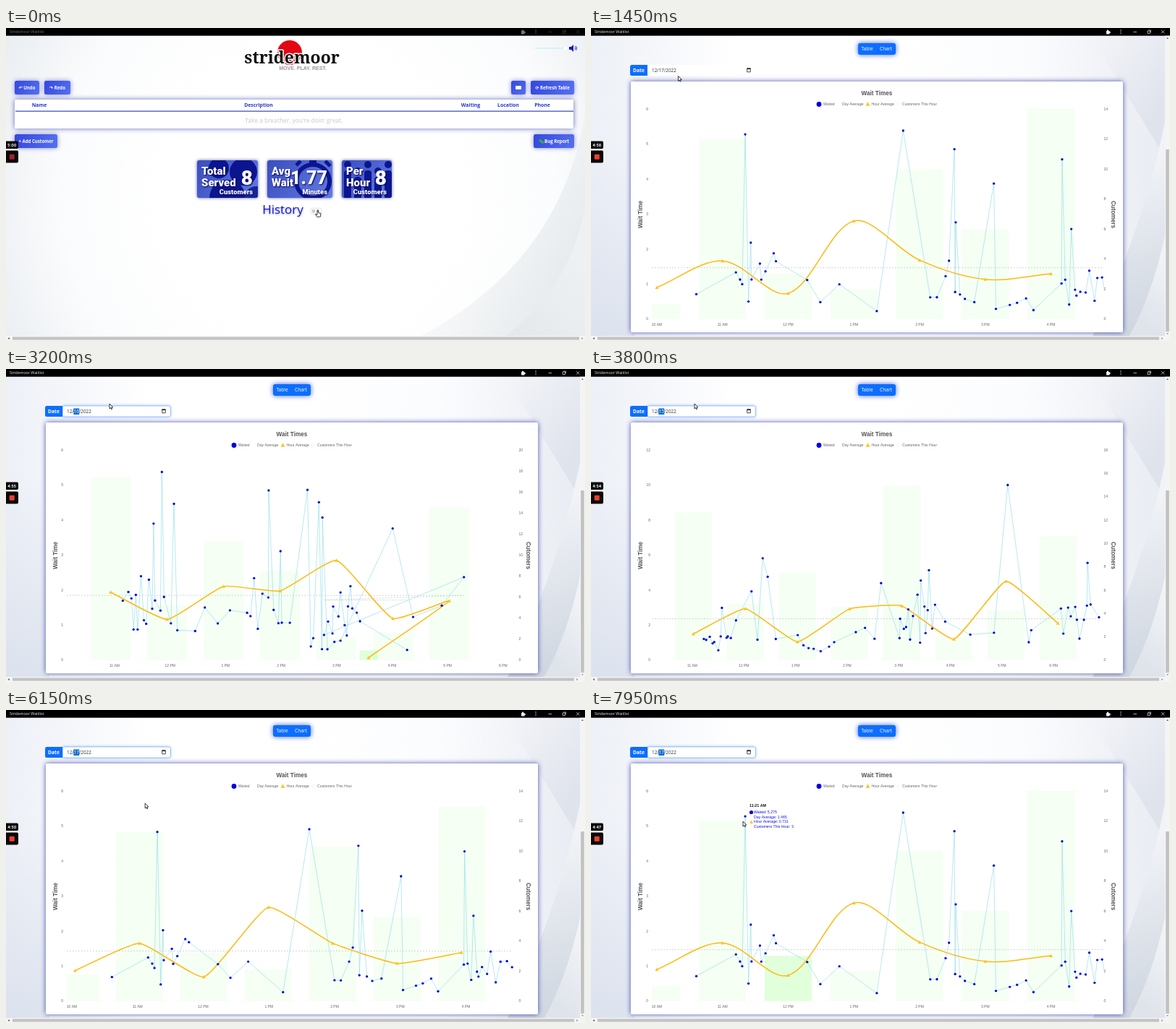
An HTML page with a canvas for the animation above (8 s loop, 800x433 px).

```html
<!DOCTYPE html>
<html lang="en">
<head>
<meta charset="utf-8">
<title>Stridemoor Waitlist</title>
<style>
  html, body { margin: 0; width: 100%; height: 100%; overflow: hidden; background: #fff; }
  canvas { display: block; width: 800px; height: 433px; }
</style>
</head>
<body>
<canvas id="stage" width="800" height="433"></canvas>
<script>
const ctx = document.getElementById('stage').getContext('2d');
const LOOP = 8000, BASE = 402.5, TOP = 112, PAGE_SCROLL = 254;
const ARIAL = '"Liberation Sans", Arial, sans-serif';
const SANS = '"Open Sans", "Noto Sans", sans-serif';
const UI = 'Inter, Roboto, sans-serif';

// Per day: hour axis, scale limits, mean wait and customers per hour, and the longest waits as [hour, minutes].
const sat17 = {
  day: 17, hourX: 91, hourStep: 90.75, firstHour: 10, maxWait: 6, maxCount: 14,
  means: [.9, 1.66, .731, 2.8, 1.68, 1.13, 1.29], counts: [1, 12, 3, 2, 10, 6, 14],
  peaks: [[11.345, 5.275], [11.43, 2.18], [13.75, 5.38], [14.53, 4.85], [14.55, 2.76],
    [15.13, 3.87], [16.17, 4.56], [16.31, 2.57]]
};
const fri16 = {
  day: 16, hourX: 150, hourStep: 76.7, firstHour: 11, maxWait: 6, maxCount: 20,
  means: [2.04, 1.11, 2.24, 1.89, 2.96, 1.19, 1.73, .07], counts: [19, 4, 12, 9, 1, 2, 14, 1],
  peaks: [[11.64, 4.1], [11.72, 5.86], [11.81, 4.37], [13.52, 5.3], [13.7, 3.36],
    [14.17, 4.89], [14.38, 4.7], [14.44, 4.41], [17.68, 2.32]]
};
const thu15 = {
  day: 15, hourX: 140, hourStep: 71.3, firstHour: 11, maxWait: 12, maxCount: 18,
  means: [1.1, 3.04, .52, 2.79, 2.67, 1.01, 4.65, 2.38], counts: [12, 5, 7, 4, 17, 2, 3, 12],
  peaks: [[11.56, 3.08], [12.19, 3.99], [12.43, 4.94], [12.54, 4.9], [14.79, 4.44],
    [15.54, 5.02], [15.68, 5.81], [17.01, 10.72], [18.69, 5.93]]
};
const changes = [[450, null, sat17], [2750, sat17, fri16], [3400, fri16, thu15], [5700, thu15, sat17]];
const OPENED = 450, FOCUSED = 1900, PICKER = [4700, 5700], HOVER = 7350;
// Pointer stops: arrival time, x, y. Each trip takes at most TRAVEL ms.
const TRAVEL = 700;
const stops = [[0, 431, 252], [1300, 125, 68], [1900, 97, 58], [2600, 143, 48], [4600, 218, 57],
  [5300, 174, 110], [5650, 158, 125], [6500, 226, 133], [7400, 210, 154]];

const lerp = (a, b, p) => a + (b - a) * p;
const clamp = v => Math.max(0, Math.min(1, v));
const smooth = v => { v = clamp(v); return v * v * (3 - 2 * v); };
const sum = list => list.reduce((a, b) => a + b, 0);
function seeded(seed) {
  return () => { const v = Math.sin(++seed * 12.9898) * 43758.5453; return v - Math.floor(v); };
}

function text(str, x, y, font, color, align = 'left') {
  ctx.font = font; ctx.fillStyle = color; ctx.textAlign = align; ctx.textBaseline = 'middle';
  ctx.fillText(str, x, y + .5);
}
function rect(x, y, w, h, color) { ctx.fillStyle = color; ctx.fillRect(x, y, w, h); }
function box(x, y, w, h, r, fill, glow, blur = 5) {
  ctx.save();
  if (glow) { ctx.shadowColor = glow; ctx.shadowBlur = blur; }
  ctx.fillStyle = fill;
  ctx.beginPath(); ctx.roundRect(x, y, w, h, r); ctx.fill();
  ctx.restore();
}
function dot(x, y, r, color) {
  ctx.fillStyle = color; ctx.beginPath(); ctx.arc(x, y, r, 0, 7); ctx.fill();
}
function line(points, color, width, dash = []) {
  ctx.strokeStyle = color; ctx.lineWidth = width; ctx.setLineDash(dash); ctx.beginPath();
  points.forEach(p => ctx.lineTo(...p));
  ctx.stroke(); ctx.setLineDash([]);
}
function shape(points, fill) {
  ctx.fillStyle = fill; ctx.beginPath();
  points.forEach(p => ctx.lineTo(...p));
  ctx.closePath(); ctx.fill();
}
const triangle = (x, y, r, color) => shape([[x, y - r], [x + r, y + r * .8], [x - r, y + r * .8]], color);
function colorStops(g, colors) {
  colors.forEach((c, i) => g.addColorStop(i / (colors.length - 1), c));
  return g;
}
const gradient = (x0, y0, x1, y1, ...colors) => colorStops(ctx.createLinearGradient(x0, y0, x1, y1), colors);
// Region right of a curve, down to the corner of the stage.
function swoosh(x0, y0, cx, cy, x1, y1, fill) {
  ctx.fillStyle = fill; ctx.beginPath(); ctx.moveTo(x0, y0);
  ctx.quadraticCurveTo(cx, cy, x1, y1);
  ctx.lineTo(800, 433); ctx.lineTo(800, y0); ctx.fill();
}

function background(open) {
  if (!open) {
    const glow = ctx.createRadialGradient(420, 230, 200, 420, 230, 480);
    rect(0, 0, 800, 433, colorStops(glow, ['#ffffff', '#fbfcfd', '#e9edf1']));
    swoosh(800, 120, 765, 330, 560, 433, gradient(600, 330, 800, 433, '#fafbfb', '#dfe4e8'));
    swoosh(800, 250, 775, 370, 680, 433, gradient(700, 433, 800, 330, '#e4e8eb', '#eef1f3'));
    return;
  }
  rect(0, 0, 800, 433, gradient(0, 0, 800, 0, '#edf0f7', '#ffffff', '#ffffff', '#fbfcfe', '#e8ebf2'));
  rect(0, 150, 60, 283, gradient(0, 150, 0, 433, 'rgba(215,222,235,0)', 'rgba(215,222,235,.8)'));
  shape([[690, 10], [800, 10], [800, 190]], gradient(690, 10, 800, 100, '#f4f5f9', '#dfe3ec'));
  swoosh(800, 90, 775, 250, 690, 433, gradient(720, 200, 800, 400, '#f1f3f7', '#cfd6e0'));
  swoosh(800, 250, 782, 360, 740, 433, gradient(750, 400, 800, 330, '#dfe4eb', '#f0f2f6'));
}

function button(label, x, y, w) {
  box(x, y, w, 19, 2.5, gradient(x, y, x + w, y + 19, '#3548dc', '#5470f0'), 'rgba(40,50,190,.55)', 6);
  text(label, x + w / 2, y + 9.5, `bold 6.1px ${SANS}`, '#fff', 'center');
}
function statCard(x, w, lines, value, size, unit, decorate) {
  ctx.save();
  box(x, 183, w, 52, 3, gradient(x, 183, x + w, 235, '#3a4ec0', '#627ae2'), 'rgba(30,40,120,.7)', 4);
  ctx.beginPath(); ctx.roundRect(x, 183, w, 52, 3); ctx.clip();
  decorate();
  ctx.shadowColor = '#000050'; ctx.shadowBlur = 2; ctx.shadowOffsetX = ctx.shadowOffsetY = 1;
  const font = s => `900 condensed ${s}px Roboto, sans-serif`;
  lines.forEach((s, i) => text(s, x + 6, 198 + 16 * i, font(15), '#fff'));
  text(value, x + w - 7, 208, font(size), '#fff', 'right');
  text(unit, x + w - 7, 227, font(9.4), '#fff', 'right');
  ctx.restore();
}

function waitlistPage(t) {
  const navy = '#0c1590', blue = '#2638c8';
  dot(392, 34, 17, '#e30613');
  ctx.font = 'bold 23px "Noto Serif", serif'; ctx.textAlign = 'center'; ctx.textBaseline = 'middle';
  ctx.strokeStyle = '#fff'; ctx.lineWidth = 3; ctx.lineJoin = 'round';
  ctx.strokeText('stridemoor', 395, 42.5);
  text('stridemoor', 395, 42, ctx.font, '#111', 'center');
  text('MOVE. PLAY. REST.', 410, 56, `bold 7px ${ARIAL}`, '#999', 'center');

  line([[731, 28], [773, 28]], '#c9f3f8', 1.5);
  dot(773, 28, 2.3, '#fff');
  shape([[778, 26], [781, 26], [784, 23], [784, 33], [781, 30], [778, 30]], '#1515c8');
  ctx.strokeStyle = '#1515c8'; ctx.lineWidth = 1;
  [2, 4].forEach(r => { ctx.beginPath(); ctx.arc(784.5, 28, r, -.9, .9); ctx.stroke(); });

  button('↶ Undo', 12, 73, 34);
  button('↷ Redo', 53, 73, 36);
  button('', 698, 73, 20);
  box(704, 80, 8, 5, 1, '#fff');
  button('⟳ Refresh Table', 725, 73, 60);
  box(12, 99, 772, 40, 2, '#fff', 'rgba(50,60,170,.75)', 7);
  [['Name', 46], ['Description', 349], ['Waiting', 642], ['Location', 694], ['Phone', 741]]
    .forEach(([s, x]) => text(s, x, 107, `bold 6.9px ${SANS}`, blue, 'center'));
  rect(13, 114.5, 771, 1.2, '#3444bd');
  text('Take a breather, you\'re doin\' great.', 398, 128, `600 8.1px ${SANS}`, '#d3d5da', 'center');
  button('+ Add Customer', 12, 147, 59);
  button('     Bug Report', 729, 147, 56);
  ctx.save(); ctx.translate(740, 157); ctx.rotate(.6);
  box(-4, -1.7, 8, 3.4, 1.7, '#35ac45'); ctx.restore();

  statCard(264, 84, ['Total', 'Served'], '8', 28, 'Customers', () => {
    dot(294, 194, 14, navy); dot(328, 199, 19, navy); dot(306, 235, 25, navy); dot(346, 236, 17, '#18269a');
  });
  statCard(361, 90, ['Avg', 'Wait'], '1.77', 25, 'Minutes', () => {
    ctx.strokeStyle = navy; ctx.lineWidth = 6;
    ctx.beginPath(); ctx.arc(424, 212, 23, 0, 7); ctx.stroke();
    rect(419, 183, 10, 5, navy);
    line([[401, 190], [407, 184]], navy, 5);
    line([[441, 184], [448, 191]], navy, 5);
  });
  statCard(464, 69, ['Per', 'Hour'], '8', 28, 'Customers', () => {
    for (let i = 0; i < 5; i++) {
      const y = 197 + 9 * (i % 2);
      box(467 + 14 * i, y, 10, 40, 4, navy);
      dot(472 + 14 * i, y - 8, 5, navy);
    }
  });
  ctx.save(); ctx.shadowColor = 'rgba(30,30,220,.5)'; ctx.shadowBlur = 3; ctx.shadowOffsetY = 1;
  text('History', 382.5, 252, `17px ${SANS}`, '#1616d2', 'center'); ctx.restore();
  box(421, 250, 15, 7, 3.5, t < OPENED ? '#fff' : '#0d6efd', '#aaa', 2);
  dot(t < OPENED ? 425 : 432.5, 253.5, 2.4, t < OPENED ? '#ccc' : '#fff');
}

const xAt = (day, hour) => day.hourX + (hour - day.firstHour) * day.hourStep;
const yAt = (value, max) => BASE - value / max * (BASE - TOP);

// Ordinary waits share what the longest ones leave of each hour's total.
function allWaits(day) {
  const rand = seeded(day.day);
  return day.counts.flatMap((count, i) => {
    const hour = day.firstHour + i;
    const peaks = day.peaks.filter(p => Math.floor(p[0]) === hour);
    const rest = count - peaks.length;
    const mean = Math.max(.2, (count * day.means[i] - sum(peaks.map(p => p[1]))) / rest);
    const others = Array.from({ length: rest }, (_, k) =>
      [hour + .15 + .7 * (k + rand()) / rest, mean * (.4 + 1.2 * rand())]);
    return [...peaks, ...others].sort((a, b) => a[0] - b[0]);
  });
}
// Every series holds [hour, y] pairs.
for (const day of [sat17, fri16, thu15]) {
  const perHour = (list, max) => list.map((v, i) => [day.firstHour + i, yAt(v, max)]);
  const waits = allWaits(day);
  const average = sum(day.means.map((m, i) => m * day.counts[i])) / sum(day.counts);
  day.series = {
    waits: waits.map(([h, m]) => [h, yAt(m, day.maxWait)]),
    average: waits.map(([h]) => [h, yAt(average, day.maxWait)]),
    means: perHour(day.means, day.maxWait),
    bars: perHour(day.counts, day.maxCount)
  };
}

// Points move from their old places by index; added ones rise from the base, a day off the old axis.
function mixed(name, from, to, p) {
  return to.series[name].map(([hour, y], i) => {
    const x = xAt(to, hour), old = from?.series[name][i];
    const x0 = old ? xAt(from, old[0]) : from ? xAt(from, hour - 24) : x;
    return [lerp(x0, x, p), lerp(old ? old[1] : BASE, y, p)];
  });
}

function spline(points, tension, color) {
  const dist = (a, b) => Math.hypot(a[0] - b[0], a[1] - b[1]);
  const handles = points.map((c, i) => {
    const a = points[i - 1] ?? c, b = points[i + 1] ?? c;
    const before = dist(a, c), after = dist(c, b), total = before + after || 1;
    const at = k => [c[0] + k * (b[0] - a[0]), c[1] + k * (b[1] - a[1])];
    return [at(-tension * before / total), at(tension * after / total)];
  });
  ctx.strokeStyle = color; ctx.lineWidth = 1.5; ctx.beginPath();
  points.forEach((p, i) => i
    ? ctx.bezierCurveTo(...handles[i - 1][1], ...handles[i][0], ...p)
    : ctx.moveTo(...p));
  ctx.stroke();
  points.forEach(([x, y]) => triangle(x, y, 2.5, '#ffc421'));
}

function axes(chart) {
  const font = `5px ${ARIAL}`, grey = '#666';
  const step = chart.maxWait / 6;
  for (let i = 0; i <= 6; i++) {
    const y = lerp(BASE, TOP, i / 6);
    line([[85, y], [704, y]], 'rgba(0,0,0,.018)', .5);
    text(i * step, step > 1 ? 82 : 79, y, font, grey, 'right');
  }
  for (let n = 0; n <= chart.maxCount; n += 2) text(n, 708.5, yAt(n, chart.maxCount), font, grey);
  for (let hour = chart.firstHour; xAt(chart, hour) < 700; hour++)
    text(`${(hour + 11) % 12 + 1} ${hour < 12 ? 'AM' : 'PM'}`, xAt(chart, hour), 410, font, grey, 'center');
  text('Wait Times', 395, 90, `bold 8.2px ${ARIAL}`, '#555', 'center');
  [['Wait Time', 68, -1], ['Cutomers', 722, 1]].forEach(([s, x, turn]) => {
    ctx.save(); ctx.translate(x, 258); ctx.rotate(turn * Math.PI / 2);
    text(s, 0, 0, `bold 8.2px ${ARIAL}`, '#555', 'center'); ctx.restore();
  });
  dot(315, 105.5, 3.4, '#0000e6');
  triangle(382.5, 105.3, 3, '#ffc421');
  dot(424.5, 105.5, 3, '#f6fef3');
  [['Waited', 321], ['Day Average', 347], ['Hour Average', 387.5], ['Customers This Hour', 430]]
    .forEach(([s, x]) => text(s, x, 105, `5.1px ${ARIAL}`, grey));
}

function chartPage(t) {
  const [start, from, to] = changes.findLast(c => t >= c[0]);
  box(369, 21, 52, 16, 3, '#0d6efd', 'rgba(20,60,220,.8)', 7);
  text('Table', 381.5, 29, `6.6px ${SANS}`, '#fff', 'center');
  text('Chart', 407.5, 29, `6.6px ${SANS}`, '#fff', 'center');
  dateField(to.day, t >= FOCUSED);

  box(55, 74, 680, 347, 2, '#fff', 'rgba(30,40,160,.8)', 7);
  const hover = t >= HOVER, elapsed = clamp((t - start) / 1000);
  const view = name => mixed(name, from, to, 1 - (1 - elapsed) ** 4);
  const waits = view('waits'), average = view('average');
  axes(to);
  ctx.save();
  ctx.beginPath(); ctx.rect(84, 105, 625, 300); ctx.clip();
  view('bars').forEach(([x, y], i) => {
    const isNew = from && i >= from.counts.length && elapsed < 1;
    const w = .715 * to.hourStep * (isNew ? elapsed : 1);
    rect(x - w / 2, y, w, BASE - y, `rgba(90,255,60,${hover && i === 2 || isNew ? .19 : .057})`);
  });
  line([[84, average[0][1]], ...average], '#c9c9cf', .8, [2, 2]);
  line(waits, '#8fdde8', .65);
  spline(view('means'), .32 * elapsed, '#ffb90f');
  waits.forEach(([x, y]) => dot(x, y, 1.65, '#0000e0'));
  ctx.restore();

  if (hover) tooltip();
  if (t >= PICKER[0] && t < PICKER[1]) picker();
}

function dateField(day, focused) {
  const font = `6.4px ${SANS}`;
  box(78, 51, 149, 15, 2, '#fff', focused && '#86b7fe', 4);
  if (focused) {
    ctx.strokeStyle = '#86b7fe'; ctx.lineWidth = .8;
    ctx.beginPath(); ctx.roundRect(78.3, 51, 149, 15, 2); ctx.stroke();
  }
  box(54, 51, 24, 15, [2.5, 0, 0, 2.5], '#0d6efd');
  text('Date', 66, 58.5, `bold 6.7px ${SANS}`, '#fff', 'center');
  text('12/', 84, 58.5, font, '#333');
  const x = 84 + ctx.measureText('12/').width, w = ctx.measureText('17').width;
  if (focused) rect(x - .3, 54.5, w + .6, 8.5, '#0a6cd8');
  text(day, x, 58.5, font, focused ? '#fff' : '#333');
  text('/2022', x + w, 58.5, font, '#333');
  ctx.strokeStyle = '#222'; ctx.lineWidth = .8; ctx.strokeRect(215.7, 56, 4.6, 4.8);
  rect(215.5, 55.5, 5, 1.6, '#222');
}

function picker() {
  const font = `5.2px ${UI}`, x = i => 88.5 + 11.7 * i;
  box(79, 67, 90, 116, 1, '#fff', 'rgba(0,0,0,.55)', 3);
  text('December 2022 ▾', 83, 75.5, `bold 5.2px ${UI}`, '#111');
  text('↑', 145, 75.5, `10px ${UI}`, '#333', 'center');
  text('↓', 158.5, 75.5, `10px ${UI}`, '#333', 'center');
  ['Su', 'Mo', 'Tu', 'We', 'Th', 'Fr', 'Sa'].forEach((s, i) => text(s, x(i), 91, font, '#222', 'center'));
  rect(130, 121, 11, 11, '#222');
  rect(130.8, 121.8, 9.4, 9.4, '#0d6efd');
  ctx.strokeStyle = '#8a8fa0'; ctx.lineWidth = .7; ctx.strokeRect(83, 132.8, 11, 11);
  for (let i = 0; i < 42; i++) {
    const d = i - 3, inside = d > 0 && d < 32;
    const color = d === 15 ? '#fff' : inside ? '#222' : '#999';
    text(d < 1 ? d + 30 : d > 31 ? d - 31 : d, x(i % 7), 103 + 11.7 * Math.floor(i / 7), font, color, 'center');
  }
  text('Clear', 93, 174, font, '#1a78d8', 'center');
  text('Today', 153, 174, font, '#1a78d8', 'center');
}

function tooltip() {
  text('11:21 AM', 219, 132.5, `bold 5.3px ${ARIAL}`, '#111');
  dot(221.5, 141.5, 2.6, '#0000e6');
  triangle(221.5, 155, 2.5, '#ffc421');
  ['Waited: 5.275', 'Day Average: 1.465', 'Hour Average: 0.731', 'Customers This Hour: 3']
    .forEach((s, i) => text(s, 225, 141 + 6.7 * i, `5.2px ${ARIAL}`, '#1414e0'));
}

function windowFrame(t, scroll, open) {
  const dim = t < 300, ink = dim ? '#777' : '#eee', control = dim ? '#444' : '#eee';
  const right = open ? 793 : 800;
  rect(0, 0, 800, 10.7, '#000');
  text('Stridemoor Waitlist', 5, 5, `5.3px ${SANS}`, ink);
  rect(712, 4, 4.5, 4.5, ink); dot(714, 3.5, 1.1, ink); dot(716.8, 6, 1.1, ink);
  [3, 5.3, 7.6].forEach(y => dot(732, y, .65, ink));
  line([[749.5, 5.5], [754, 5.5]], control, .7);
  line([[769, 4], [772.4, 4], [772.4, 7.4], [769, 7.4], [769, 4]], control, .7);
  line([[770.2, 3], [773.5, 3], [773.5, 6.2]], control, .6);
  line([[788, 3.2], [792.3, 7.5]], control, .7);
  line([[792.3, 3.2], [788, 7.5]], control, .7);

  rect(0, 426, 800, 7, '#f4f4f4');
  rect(9, 427.3, right - 17, 4.2, '#c3c3c3');
  shape([[2.5, 429.5], [4.8, 428], [4.8, 431]], '#555');
  shape([[right - 2.5, 429.5], [right - 4.8, 428], [right - 4.8, 431]], '#999');
  if (open) {
    rect(793, 10.7, 7, 415.3, '#f4f4f4');
    rect(794.2, lerp(16, 168, scroll / PAGE_SCROLL), 4.6, 252, '#c1c1c1');
    shape([[796.5, 13], [795, 15], [798, 15]], '#666');
    shape([[796.5, 424], [795, 422], [798, 422]], '#999');
  }
}

function recorder(t) {
  const left = 300 - Math.floor(t * 1.645 / 1000);
  box(-3, 156.5, 20, 10.5, 2, '#080808');
  text(`${Math.floor(left / 60)}:${String(left % 60).padStart(2, '0')}`, 8.2, 161.5, `bold 5.2px ${UI}`, '#fff', 'center');
  box(-3, 169.5, 20, 17, 2, '#0c0808');
  box(4.7, 174.8, 7, 7, 1, t < 300 ? '#9c2230' : '#ee4030');
}

function pointer(t) {
  const i = stops.findLastIndex(s => t >= s[0]);
  const [left, x0, y0] = stops[i], [arrive, x1, y1] = stops[i + 1] ?? [LOOP, x0, y0];
  const travel = Math.min(TRAVEL, arrive - left);
  const p = smooth((t - arrive + travel) / travel);
  ctx.save(); ctx.translate(lerp(x0, x1, p), lerp(y0, y1, p));
  ctx.lineWidth = .9; ctx.strokeStyle = '#222'; ctx.fillStyle = '#fff'; ctx.lineJoin = 'round';
  const hand = [[-1, 0], [.5, 0], [.5, 3.5], [4, 4.5], [3.5, 9], [-1, 9.5], [-3.5, 5.5], [-1, 6.3]];
  const arrow = [[0, 0], [0, 7], [1.6, 5.6], [2.6, 7.8], [3.6, 7.3], [2.7, 5.1], [4.8, 5]];
  ctx.beginPath();
  (t < 650 ? hand : arrow).forEach(q => ctx.lineTo(...q));
  ctx.closePath(); ctx.fill(); ctx.stroke();
  ctx.restore();
}

function draw(t) {
  const open = t >= OPENED;
  const scroll = PAGE_SCROLL * smooth((t - 680) / 420);
  background(open);
  ctx.save(); ctx.translate(0, -scroll);
  waitlistPage(t);
  if (open) { ctx.translate(0, PAGE_SCROLL); chartPage(t); }
  ctx.restore();
  windowFrame(t, scroll, open);
  recorder(t);
  pointer(t);
}

const began = performance.now();
(function tick() {
  draw((performance.now() - began) % LOOP);
  requestAnimationFrame(tick);
})();
</script>
</body>
</html>
```
